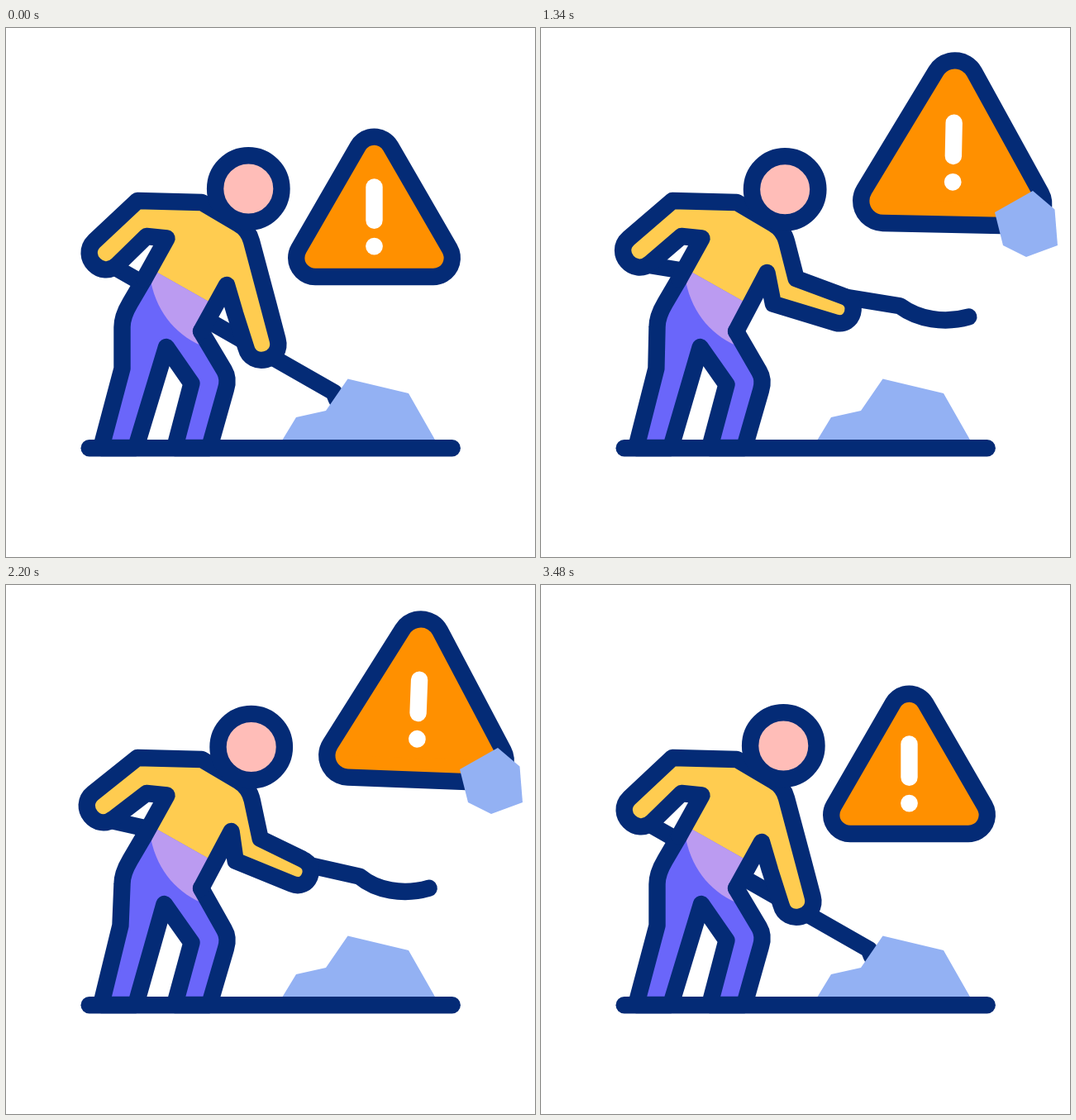
Write an HTML page with a canvas that moves like this. It is 640 by 640 pixels and loops after 3.6 s.

```html
<!DOCTYPE html>
<html lang="en">
<head>
<meta charset="utf-8">
<title>Road works</title>
<style>
  html, body { margin: 0; width: 100%; height: 100%; overflow: hidden; background: #fff; }
  canvas { display: block; width: 640px; height: 640px; }
</style>
</head>
<body>
<canvas id="stage" width="640" height="640"></canvas>
<script>
const ctx = document.getElementById('stage').getContext('2d');

const LOOP = 3600, BEAT = 600, LINE = 20.4;
const NAVY = '#042b76', YELLOW = '#ffcc50', PINK = '#ffbdb8', ORANGE = '#ff9000';
const PURPLE = '#6a66fa', LILAC = '#bb9bf1', STONE = '#93b1f3';

// Joints that move; all other body points are fixed.
const REST = {
  head: [293.3, 194.5],
  backLow: [135, 286.3], backTop: [107, 257.7],
  neck: [293, 243.5], shoulder: [297, 258], elbow: [317, 333],
  handTop: [328.6, 377], handLow: [290.4, 387],
  elbowIn: [277, 345], armpit: [267, 311],
  kneeL: [140.5, 412], crotch: [194, 386], kneeIn: [224.5, 430],
  kneeTop: [264, 414], kneeMid: [270, 424], kneeLow: [266, 437],
  grip: [121, 283.5], neckShovel: [397, 441],
  blade1: [402, 462], blade2: [430, 485], tip: [470, 482]
};
const DIG = {
  ...REST,
  head: [306.6, 200.6],
  backLow: [116.7, 271.4], backTop: [100.5, 234.8],
  neck: [298, 249], shoulder: [300, 268], elbow: [301.5, 331],
  handTop: [317.8, 380.6], handLow: [280.7, 394.2], elbowIn: [257, 333],
  kneeL: [132.5, 412], crotch: [184.3, 386], kneeIn: [224.5, 440.5],
  kneeTop: [264, 424.5], kneeMid: [270, 434.5], kneeLow: [266, 447.5],
  grip: [108.6, 268.5], neckShovel: [387.3, 456],
  blade1: [392, 475], blade2: [430, 490], tip: [476, 476]
};
const LIFT = {
  ...REST,
  elbow: [309.8, 298.6], handTop: [373, 314.9], handLow: [368.5, 350.5],
  elbowIn: [284.8, 334], armpit: [274.5, 293.6],
  grip: [122, 288], neckShovel: [441.8, 316.8],
  blade1: [467, 332.7], blade2: [497.3, 336.5], tip: [524, 329]
};
const POSES = [REST, DIG, LIFT, DIG, LIFT, REST, REST];

const PILE = [[334, 499], [351, 471], [387, 463], [413.5, 424.5], [487, 442], [519.5, 499]];
const ROCK = [[-38, -14], [8, -40], [34.5, -17.5], [38, 26], [0, 40], [-28, 26]];

const lerp = (a, b, k) => a + (b - a) * k;
const mix = (p, q, k) => [lerp(p[0], q[0], k), lerp(p[1], q[1], k)];
const ease = (t, from, to) => {
  const k = Math.min(1, Math.max(0, (t - from) / (to - from)));
  return k * k * (3 - 2 * k);
};

function poseAt(t) {
  const i = Math.floor(t / BEAT), k = ease(t, i * BEAT, (i + 1) * BEAT);
  const pose = {};
  for (const key in REST) pose[key] = mix(POSES[i][key], POSES[i + 1][key], k);
  return pose;
}

function line(path, ...points) {
  for (const p of points) path.lineTo(p[0], p[1]);
}

// Half circle from p to q.
function cap(path, p, q) {
  const x = (q[1] - p[1]) * 2 / 3, y = (p[0] - q[0]) * 2 / 3;
  path.bezierCurveTo(p[0] + x, p[1] + y, q[0] + x, q[1] + y, q[0], q[1]);
}

function fill(path, color) {
  ctx.fillStyle = color;
  ctx.fill(path);
}

function stroke(path, color = NAVY, width = LINE) {
  ctx.strokeStyle = color;
  ctx.lineWidth = width;
  ctx.stroke(path);
}

function polygon(points) {
  const path = new Path2D();
  line(path, ...points);
  path.closePath();
  return path;
}

function drawShovel(p) {
  const path = new Path2D();
  line(path, p.grip, p.neckShovel);
  path.bezierCurveTo(...p.blade1, ...p.blade2, ...p.tip);
  stroke(path);
}

function drawBody(p) {
  const torso = new Path2D();
  line(torso, [167, 304], [194.5, 254.5], [170, 252], p.backLow);
  cap(torso, p.backLow, p.backTop);
  line(torso, [159, 209], [237, 211], [281, 237]);
  torso.quadraticCurveTo(...p.neck, ...p.shoulder);
  line(torso, p.elbow, p.handTop);
  cap(torso, p.handTop, p.handLow);
  line(torso, p.elbowIn, p.armpit, [236, 367]);

  const legs = new Path2D();
  line(legs, [236, 367], p.kneeTop);
  legs.quadraticCurveTo(...p.kneeMid, ...p.kneeLow);
  line(legs, [246, 508], [204, 508], p.kneeIn, p.crotch, [157, 508], [115, 508], p.kneeL, [140.5, 362]);
  legs.quadraticCurveTo(140.5, 349, 150, 333);
  line(legs, [167, 304]);

  const seat = new Path2D(legs);
  line(seat, [178, 293], [247, 332]);

  const shirt = new Path2D();
  line(shirt, [178, 293], [247, 332], [236, 367], [236, 384]);
  shirt.bezierCurveTo(203, 370, 180, 340, 174, 300);

  fill(torso, YELLOW);
  fill(seat, PURPLE);
  fill(shirt, LILAC);
  stroke(legs);
  stroke(torso);

  const head = new Path2D();
  head.arc(...p.head, 40.2, 0, Math.PI * 2);
  fill(head, PINK);
  stroke(head);
}

function drawSign(t) {
  const away = t < 3000 ? ease(t, 0, BEAT) : 1 - ease(t, 3000, 3480);
  const pulse = start => ease(t, start, start + BEAT) - ease(t, start + BEAT, start + 2 * BEAT);
  const size = 1 + 0.2 * (pulse(600) + pulse(1800));
  const r = 22.8 * size;

  ctx.save();
  ctx.translate(445.5 + 53.7 * away, 216.4 - 77.8 * away);
  ctx.rotate(8.5 * Math.PI / 180 * pulse(1200));
  const plate = polygon([[0, -61.9], [71.5, 61.8], [-71.5, 61.8]].map(([x, y]) => [x * size, y * size]));
  stroke(plate, NAVY, 2 * r + LINE);
  stroke(plate, ORANGE, 2 * r - LINE);
  fill(plate, ORANGE);

  const bar = new Path2D();
  line(bar, [0, -23.9], [0, 16.4]);
  stroke(bar, '#fff');
  const dot = new Path2D();
  dot.arc(0, 47.7, 10.4, 0, Math.PI * 2);
  fill(dot, '#fff');
  ctx.restore();
}

// Each stone flies up, hangs by the sign, then leaves the stage.
function drawRock(age) {
  if (age < 0 || age > 1020) return;
  const up = ease(age, 0, 350), out = ease(age, 740, 1020);
  const x = lerp(450, 587, up) + 105 * out;
  const y = lerp(476, 237, up) - 25 * out;
  fill(polygon(ROCK.map(p => [p[0] + x, p[1] + y])), STONE);
}

function draw(t) {
  ctx.fillStyle = '#fff';
  ctx.fillRect(0, 0, 640, 640);
  ctx.lineCap = ctx.lineJoin = 'round';
  const pose = poseAt(t);
  drawSign(t);
  drawShovel(pose);
  drawBody(pose);
  fill(polygon(PILE), STONE);
  drawRock(t - 600);
  drawRock(t - 1800);
  const ground = new Path2D();
  line(ground, [100.7, 508.2], [539.7, 508.2]);
  stroke(ground);
}

const begin = performance.now();
function tick() {
  draw((performance.now() - begin) % LOOP);
  requestAnimationFrame(tick);
}
tick();
</script>
</body>
</html>
```
